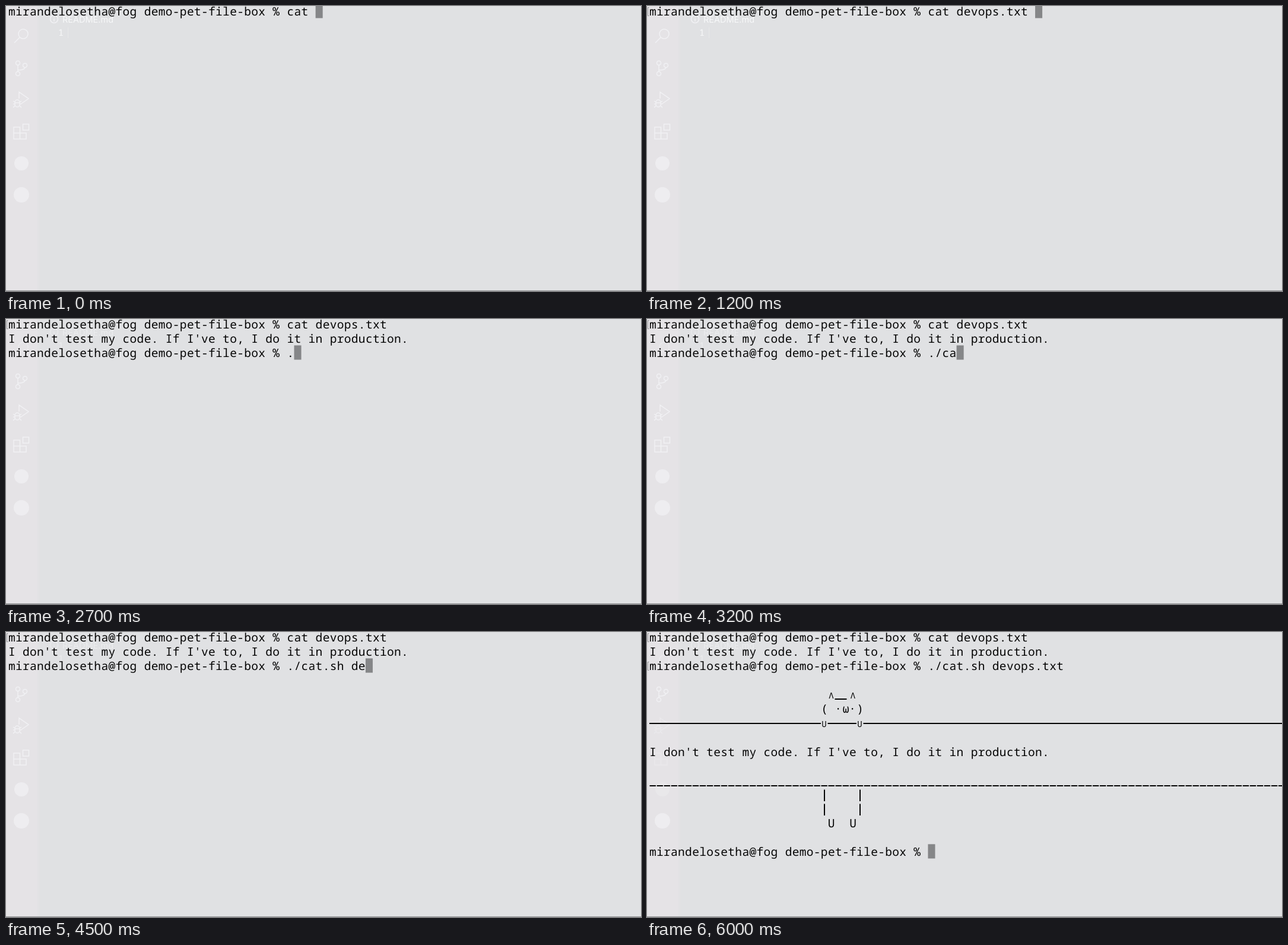
An HTML page that plays this animation: 1070x480 px, repeating every 7000 ms.

```html
<!DOCTYPE html>
<html lang="en">
<head>
<meta charset="utf-8">
<title>Terminal</title>
<style>
  html, body { margin: 0; width: 100%; height: 100%; overflow: hidden; background: #e0e1e3; }
  svg { display: block; }
  text { white-space: pre; text-rendering: geometricPrecision; }
  .term { font: 19.5px "Noto Sans Mono", "DejaVu Sans Mono", monospace; letter-spacing: .34px; fill: #050505; }
  .cat { font: 19.5px "Noto Sans Mono", "DejaVu Sans Mono", monospace; text-anchor: middle; fill: #050505; }
  .small { font-size: 14px; font-weight: 500; }
  .rule { stroke: #050505; stroke-width: 2; fill: none; }
  .mark { fill: none; stroke: #8f9092; }
  .icon { fill: none; stroke: #f1f1f4; stroke-width: 1.5; }
  .dot { fill: #eeedf0; }
  .ghost { fill: #f7f8f9; }
</style>
</head>
<body>
<svg width="1070" height="480" viewBox="0 0 1070 480">
  <rect width="1070" height="480" fill="#e0e1e3"/>
  <rect width="53" height="480" fill="#e5e3e6"/>
  <rect x="53" width="3" height="480" fill="#e2e2e4"/>
  <rect y="479" width="1070" height="1" fill="#8d8e90"/>

  <g id="editor">
    <path class="icon" d="M23.5 52.5L14 62M37 47a8 8 0 1 1-16 0a8 8 0 1 1 16 0"/>
    <circle class="icon" cx="81" cy="22" r="6.5"/>
    <path class="icon" d="M81 21v5M81 18v1.5"/>
    <text class="ghost" x="95" y="27.5" font-family="Inter, sans-serif" font-size="14.5">README.md</text>
    <text class="ghost" x="88" y="50" font-family="Noto Sans Mono, monospace" font-size="15">1</text>
    <path d="M104.5 36V54" stroke="#e7e8e9"/>
  </g>
  <g class="icon">
    <circle cx="20" cy="96" r="3.5"/><circle cx="20" cy="114" r="3.5"/><circle cx="32" cy="100" r="3.5"/>
    <path d="M20 99.5V110.5M32 103.5Q31 108 20 108"/>
  </g>
  <g id="lower">
    <path class="icon" d="M22 156V145L38 156L25 165M15 162a4 4 0 0 1 8 0v4a4 4 0 0 1-8 0zM15 163h8M12 160l3 2M26 160l-3 2M12 165h3M23 165h3M12 171l3-3M26 171l-3-3"/>
    <path class="icon" d="M13 204H23.500V224H13ZM13 214H34V224H23M28.500 199H38.500V209H28.500Z"/>
    <circle class="dot" cx="26" cy="265" r="12"/>
  </g>
  <circle class="dot" cx="26" cy="318" r="13"/>

  <rect id="cursor" width="12.04" height="24.1" fill="#858688"/>
  <path id="mark0" class="mark" d="M3.500 2.500H1.500V16.500H3.500"/>
  <path id="mark2" class="mark" d="M3.500 50.500H1.500V64.500H3.500"/>
  <g id="rows"></g>

  <g id="art">
    <g class="cat">
      <text class="small" x="310.500" y="111.500">Λ</text><text class="small" x="347" y="111.500">Λ</text>
      <text x="299" y="136">(</text><text x="322" y="136">·</text><text x="335" y="136">ω</text>
      <text x="346" y="136">·</text><text x="359" y="136">)</text>
      <text class="small" x="298.500" y="160">U</text><text class="small" x="358.500" y="160">U</text>
      <text x="310.500" y="329">U</text><text x="347" y="329">U</text>
    </g>
    <path class="rule" d="M316.500 113H336.500M4 154H293M304.500 154H353M364.500 154H1070M299 265.500V285M359 265.500V285M299 289.500V309M359 289.500V309"/>
    <path class="rule" d="M4.500 259H1070" stroke-dasharray="10.400 1.640"/>
  </g>
  <path id="pointer" d="M736 185.500Q739 185.500 739 188V197Q739 199.500 736 199.500M742 185.500Q739 185.500 739 188V197Q739 199.500 742 199.500" fill="none" stroke="#222"/>
</svg>
<script>
  const LOOP = 7000, CELL = 12.04, LINE = 24.07, LEFT = 3.9;
  const PROMPT = "mirandelosetha@fog demo-pet-file-box % ";
  const QUOTE = "I don't test my code. If I've to, I do it in production.";

  // Typed text by the time it appears
  const first = [[0, ""], [200, "d"], [600, ""], [700, "d"], [800, "de"], [1000, "dev"], [1200, "devops.txt "]];
  const second = [[1500, ""], [2700, "."], [2900, "./"], [3100, "./c"], [3200, "./ca"], [3300, "./cat"],
    [3600, "./cat."], [3900, "./cat.s"], [4000, "./cat.sh"], [4100, "./cat.sh "],
    [4400, "./cat.sh d"], [4500, "./cat.sh de"], [4800, "./cat.sh devops.txt "]];

  const $ = id => document.getElementById(id);
  const typed = (keys, t) => keys.reduce((text, [at, value]) => t >= at ? value : text, "");
  const show = (id, on) => $(id).setAttribute("visibility", on ? "visible" : "hidden");

  const rows = {};
  for (const r of [0, 1, 2, 8, 15]) {
    const el = document.createElementNS("http://www.w3.org/2000/svg", "text");
    el.setAttribute("class", "term");
    el.setAttribute("x", LEFT);
    el.setAttribute("y", 16.2 + r * LINE);
    rows[r] = $("rows").appendChild(el);
  }

  function setRow(r, text) {
    if (rows[r].textContent !== text) rows[r].textContent = text;
  }

  function draw(t) {
    const ran = t >= 1500, done = t >= 5200;
    const top = PROMPT + "cat " + typed(first, t);
    const next = ran ? PROMPT + typed(second, t) : "";
    setRow(0, top);
    setRow(1, ran ? QUOTE : "");
    setRow(2, next);
    setRow(8, done ? QUOTE : "");
    setRow(15, done ? PROMPT : "");

    const [row, col] = done ? [15, PROMPT.length] : t >= 5100 ? [3, 0]
      : ran ? [2, next.length] : [0, top.length];
    $("cursor").setAttribute("x", LEFT + col * CELL);
    $("cursor").setAttribute("y", row * LINE - 3.7);

    show("mark0", t >= 1200);
    show("mark2", t >= 4800);
    show("art", done);
    show("pointer", t >= 5900 && t < 6000);
    $("editor").setAttribute("opacity", ran ? .5 : 1);
    $("lower").setAttribute("opacity", done ? .45 : 1);
  }

  const start = performance.now();
  function tick() {
    draw((performance.now() - start) % LOOP);
    requestAnimationFrame(tick);
  }
  tick();
</script>
</body>
</html>
```
